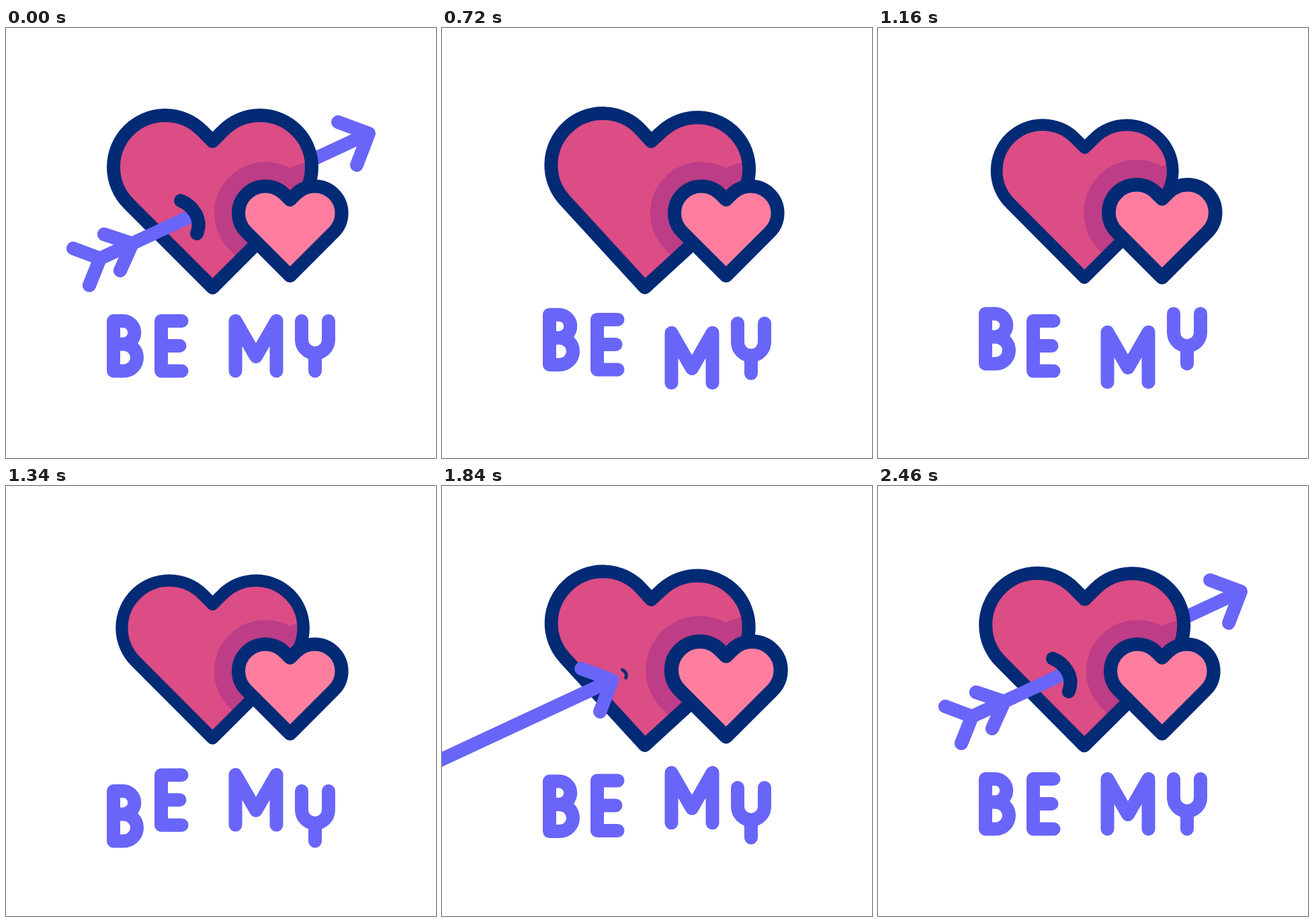
An HTML page with a canvas for the animation above (3 s loop, 640x640 px).

```html
<!DOCTYPE html>
<html lang="en">
<head>
<meta charset="utf-8">
<title>Be my</title>
<style>
  html, body { margin: 0; width: 100%; height: 100%; overflow: hidden; background: #fff; }
  canvas { display: block; width: 640px; height: 640px; }
</style>
</head>
<body>
<canvas id="stage" width="640" height="640"></canvas>
<script>
const ctx = document.getElementById('stage').getContext('2d');
const LOOP = 3000, REST = 2460;
const NAVY = '#022a75', ROSE = '#dc4c85', SHADE = '#bd3d87', PINK = '#ff7e9f', VIOLET = '#6965f9';
const ARROW_SLOPE = -0.46;

// Easing helpers
const progress = (t, from, to) => Math.min(1, Math.max(0, (t - from) / (to - from)));
const ease = p => (1 - Math.cos(Math.PI * p)) / 2;
const backIn = p => p * p * (2.7 * p - 1.7);
const pulse = (t, from, to) => Math.sin(Math.PI * progress(t, from, to)) ** 2;

// A sudden push that dies away
function kick(t, start) {
  const x = Math.max(0, t - start) / 125;
  return x * Math.exp(1 - x);
}

// Motion of each part
const bigScale = t => 1 - 0.112 * pulse(t, 700, 1660) - 0.044 * pulse(t, 1800, 2320);
const bigTurn = t => 4 * kick(t, 432) + 3.05 * kick(t, 1780);
const smallScale = t => 1 + 0.088 * (pulse(t, 720, 1280) + pulse(t, 1440, 2020));

function woundScale(t) {
  const closed = t < 1200 ? progress(t, 320, 540) : progress(t, 2030, 1830);
  return 1 - backIn(closed);
}

function arrowShift(t) {
  if (t < 300) return -16 * ease(progress(t, 200, 300));
  if (t < 1000) return -16 + 246 * ((t - 300) / 140) ** 2;
  if (t < 2000) return 23 - 593 * (1 - progress(t, 1780, 2000)) ** 2;
  return 23 * (1 - ease(progress(t, 2000, 2320)));
}

function bounce(t) {
  const sinceDrop = t - 240;
  if (sinceDrop < 0) return 18 * ease(progress(t, 0, 240));
  const wave = 2 + 16 * Math.cos(2 * Math.PI * sinceDrop / 450);
  return wave * (1 - progress(sinceDrop, 900, 1570));
}

// Two round lobes joined by 45 degree lines
function heartPath(cx, lobeY, halfGap, r) {
  const path = new Path2D();
  const d = r * Math.SQRT2;
  path.moveTo(cx, lobeY - d + halfGap);
  path.arc(cx + halfGap, lobeY, r, -Math.PI * 0.75, Math.PI * 0.25);
  path.lineTo(cx, lobeY + d + halfGap);
  path.arc(cx - halfGap, lobeY, r, Math.PI * 0.75, Math.PI * 1.75);
  path.closePath();
  return path;
}

const bigHeart = heartPath(307.5, 207, 70.5, 77);
const smallHeart = heartPath(422.8, 275.5, 36.8, 40);
const wound = new Path2D('M260 257C277 264 293 283 284 306');
const arrow = new Path2D(
  'M140 343L540 157M494 140L540 157L522 204' +
  'M100 328L140 343L124 383M146 307L188 321L170 361');
const frontSide = new Path2D('M-200 7H153L405 553L-200 640Z');

const letters = [
  'M160 436H174A17 17 0 0 1 174 470.5H160M174 470.5H175A20 20 0 0 1 175 510.5H160V436',
  'M261.5 436H231V510.5H261.5M231 473H258.5',
  'M341.5 510.5V436L372 489L402.5 436V510.5',
  'M440 436V464A20 20 0 0 0 480 464V436M460 484V510.5'
].map(d => new Path2D(d));

function stroke(path, color, width = 20) {
  ctx.strokeStyle = color;
  ctx.lineWidth = width;
  ctx.stroke(path);
}

function fill(path, color) {
  ctx.fillStyle = color;
  ctx.fill(path);
}

function pose(x, y, scale, degrees = 0) {
  ctx.translate(x, y);
  ctx.rotate(degrees * Math.PI / 180);
  ctx.scale(scale, scale);
  ctx.translate(-x, -y);
}

function layer(draw) {
  ctx.save();
  draw();
  ctx.restore();
}

function drawArrow(shift) {
  layer(() => {
    ctx.translate(shift, shift * ARROW_SLOPE);
    stroke(arrow, VIOLET);
  });
}

function render(t) {
  ctx.fillStyle = '#fff';
  ctx.fillRect(0, 0, 640, 640);
  ctx.lineCap = ctx.lineJoin = 'round';

  const shift = arrowShift(t);
  const turn = bigTurn(t);
  const open = woundScale(t);
  const placeBig = () => pose(307.5, 257.7, bigScale(t), turn);
  const placeSmall = () => pose(422.8, 302, smallScale(t));

  drawArrow(shift);
  layer(() => {
    placeBig();
    fill(bigHeart, ROSE);
  });
  layer(() => {
    const unposed = ctx.getTransform();
    placeBig();
    ctx.clip(bigHeart);
    ctx.setTransform(unposed);
    placeSmall();
    stroke(smallHeart, SHADE, 72);
  });
  layer(() => {
    placeBig();
    stroke(bigHeart, NAVY);
  });
  layer(() => {
    ctx.clip(frontSide);
    drawArrow(shift);
  });
  if (open > 0.01) layer(() => {
    pose(307.5, 257.7, 1, turn);
    pose(272, 281, open);
    stroke(wound, NAVY);
  });
  layer(() => {
    placeSmall();
    fill(smallHeart, PINK);
    stroke(smallHeart, NAVY);
  });
  letters.forEach((letter, i) => layer(() => {
    ctx.translate(0, bounce(t - 200 - 150 * i));
    stroke(letter, VIOLET);
  }));
}

const start = performance.now();
function tick() {
  const t = (performance.now() - start) % LOOP;
  render(Math.min(t, REST));
  requestAnimationFrame(tick);
}
tick();
</script>
</body>
</html>
```
